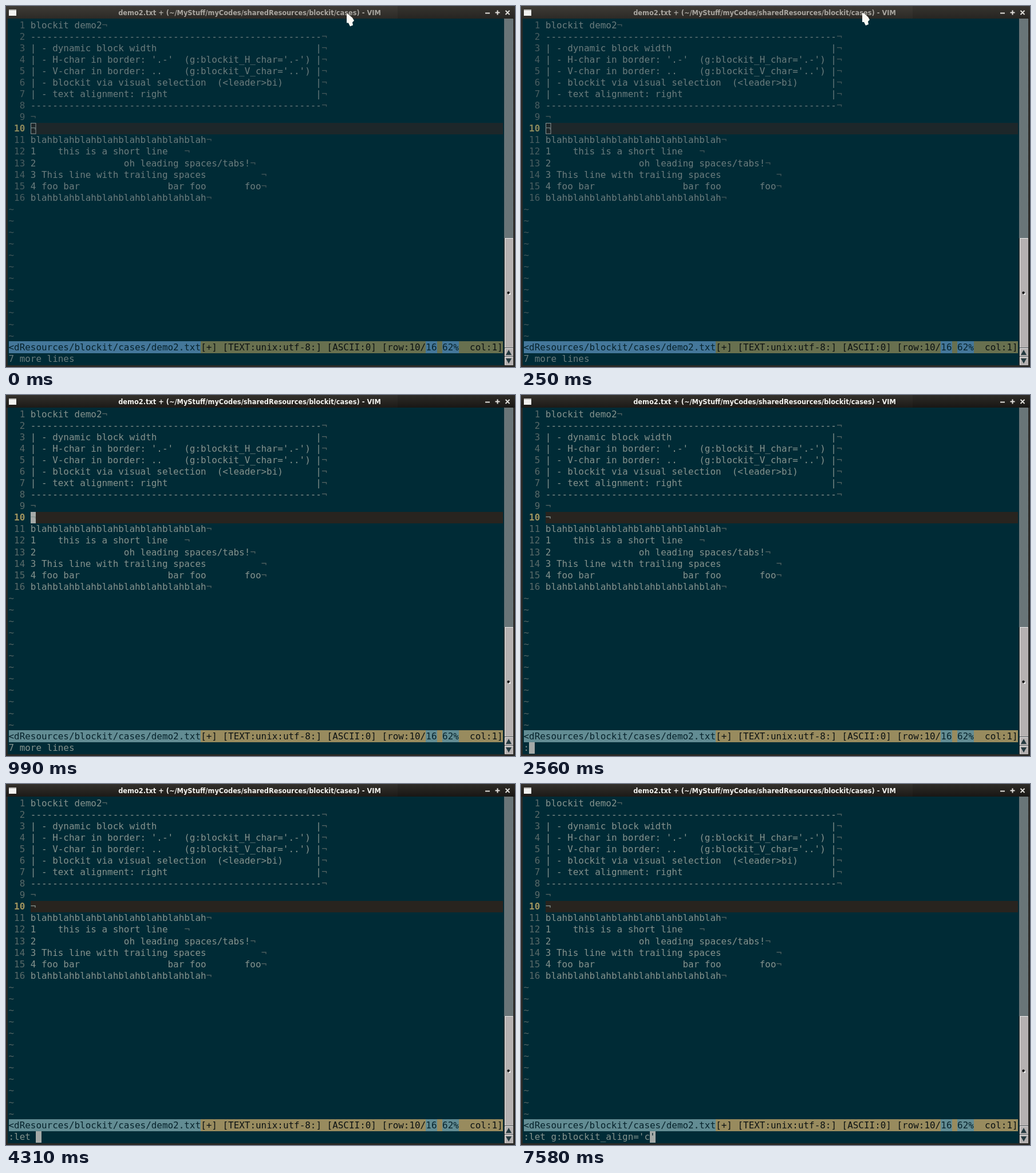
Animation of 889 by 630 pixels, one loop 8 s. Source, as an HTML page:

```html
<!DOCTYPE html>
<html lang="en">
<head>
<meta charset="utf-8">
<title>blockit demo</title>
<style>
  html, body { margin: 0; width: 100%; height: 100%; overflow: hidden; background: #002b36; }
  svg {
    display: block;
    --text: #6a7c7d; --faint: #425659; --number: #4a5e61; --current: #8d8a5c;
    --line: #1d272a; --left: #44779a; --right: #68704f;
    --title: #a9a6a0; --barTop: #3e3b36; --barEnd: #2c2a26;
  }
  svg.focused {
    --text: #84928d; --faint: #526362; --number: #596a69; --current: #a1955f;
    --line: #28241f; --left: #628c93; --right: #988b5e;
    --title: #f4f3ef; --barTop: #34312c; --barEnd: #1c1a17;
  }
  .mono text { font: 15.93px "DejaVu Sans Mono", monospace; white-space: pre; fill: var(--text); }
  .title { font: bold 11.4px "DejaVu Sans", sans-serif; fill: var(--title); text-anchor: middle; }
  .mono .faint { fill: var(--faint); }
  .mono .number { fill: var(--number); }
  .mono .current { fill: var(--current); font-weight: bold; }
  .mono .dark { fill: #06222b; }
  .mono .black { fill: #0b1112; }
  .left { fill: var(--left); }
  .right { fill: var(--right); }
  .line { fill: var(--line); }
  .block { fill: #a5aaa8; }
  .controls { stroke: #e2e0db; stroke-width: 2; fill: none; }
</style>
</head>
<body>
<svg id="stage" width="889" height="630" viewBox="0 0 889 630">
  <defs>
    <linearGradient id="bar" x2="0" y2="1">
      <stop style="stop-color: var(--barTop)"/>
      <stop offset="1" style="stop-color: var(--barEnd)"/>
    </linearGradient>
    <pattern id="stipple" width="2" height="2" patternUnits="userSpaceOnUse">
      <path fill="#293f45" d="M0 0h2v2h-2z"/>
      <path fill="#a9abab" d="M0 0h1v1h-1zM1 1h1v1h-1z"/>
    </pattern>
  </defs>

  <path fill="#2a2926" d="M0 0h889v630h-889z"/>
  <path fill="#002b36" d="M3 22h867v605h-867z"/>
  <path fill="url(#bar)" d="M0 0h889v22h-889z"/>
  <path fill="#000" opacity=".12" d="M684 0h205v22h-205z"/>
  <path fill="#f2f2f0" d="M5 6h13v11h-13z"/>
  <path fill="#b9b9b5" d="M5 6h13v2h-13z"/>
  <text class="title" x="425.5" y="16">demo2.txt + (~/MyStuff/myCodes/sharedResources/blockit/cases) - VIM</text>
  <path class="controls" d="M837 12.5h8M854.5 11.5h8M858.5 7.5v8M872.5 8l7 7M879.5 8l-7 7"/>

  <path fill="url(#stipple)" d="M870 22h16v383h-16z"/>
  <path fill="#b5b1b1" d="M871 405h15v222h-15z"/>
  <path fill="none" stroke="#eeecec" d="M871.5 596v-190.5h14M871.5 611v-13.5h14M871.5 626v-13.5h14"/>
  <path fill="none" stroke="#4d5558" d="M871 596.5h15M871 611.5h15"/>
  <path fill="#24393f" d="M878 600l5 9h-10zM878 624l5 -9h-10z"/>
  <path fill="#fff" d="M878 501h3v3h-3z"/>
  <circle cx="877.5" cy="500.5" r="2.2" fill="#111"/>

  <g id="editor" class="mono"></g>
  <g id="command" class="mono"></g>
  <path id="pointer" fill="#fbfaf4" d="M0 0L3 1L10 7L13 12L10 15L11 20L6 22L3 16L0 16Z"/>
</svg>
<script>
const LOOP = 8000, LEFT = 4.5, TOP = 23.5, CELL = 9.59, ROW = 20.07, BASELINE = 15.2;
const byId = id => document.getElementById(id);
const stage = byId('stage'), editor = byId('editor'), command = byId('command'), pointer = byId('pointer');

const escape = s => s.replace(/&/g, '&amp;').replace(/</g, '&lt;');
const colX = col => LEFT + col * CELL;
const rowY = row => TOP + (row - 1) * ROW;
const text = (row, col, s, cls = '') =>
  `<text class="${cls}" x="${colX(col)}" y="${rowY(row) + BASELINE}">${escape(s)}</text>`;

// Cell backgrounds snap to whole pixels.
function fill(row, col, count, cls, id = '') {
  const [x, right, y, bottom] =
    [colX(col), colX(col + count), rowY(row), rowY(row + 1)].map(Math.round);
  return `<rect id="${id}" class="${cls}" x="${x}" y="${y}" width="${right - x}" height="${bottom - y}"/>`;
}

const rule = '-'.repeat(53);
const boxed = s => ('| - ' + s).padEnd(52) + '|';
const blah = 'blah'.repeat(8);
const lines = [
  'blockit demo2',
  rule,
  boxed('dynamic block width'),
  boxed("H-char in border: '.-'  (g:blockit_H_char='.-')"),
  boxed("V-char in border: ..    (g:blockit_V_char='..')"),
  boxed('blockit via visual selection  (<leader>bi)'),
  boxed('text alignment: right'),
  rule,
  '',
  '',
  blah,
  '1    this is a short line   ',
  '2'.padEnd(17) + 'oh leading spaces/tabs!',
  '3 This line with trailing spaces'.padEnd(42),
  '4 foo bar'.padEnd(25) + 'bar foo'.padEnd(14) + 'foo',
  blah
];

function drawEditor() {
  let out = fill(10, 4, 86, 'line') + fill(10, 4, 1, 'block', 'cursor') +
    `<rect id="hollow" x="43.5" y="204.5" width="8.5" height="18.5" fill="none" stroke="#8b9696"/>`;
  lines.forEach((s, i) => {
    const row = i + 1;
    out += text(row, 0, String(row).padStart(3), row === 10 ? 'current' : 'number');
    out += text(row, 4, s) + text(row, 4 + s.length, '¬', row === 10 ? '' : 'faint');
  });
  for (let row = 17; row <= 28; row++) out += text(row, 0, '~', 'faint');

  out += fill(29, 0, 90, 'right');
  for (const [col, count] of [[0, 35], [76, 2], [79, 3]]) out += fill(29, col, count, 'left');
  out += text(29, 0, '<dResources/blockit/cases/demo2.txt', 'dark');
  out += text(29, 35, '[+] [TEXT:unix:utf-8:] [ASCII:0] [row:10/', 'black');
  out += text(29, 76, '16 62%', 'dark') + text(29, 84, 'col:1]', 'black');
  editor.innerHTML = out;
}

// Each entry: start time, command line, cursor column.
const setting = ":let g:blockit_align='c'";
const typing = [
  [0, '7 more lines'],
  [2560, ':', 1],
  [3150, ':l', 2],
  [3240, ':le', 3],
  [4000, ':let', 4],
  [4310, ':let ', 5],
  [5380, setting, 24],
  [7580, setting, 23]
];
// Each entry: start time, pointer position.
const moves = [
  [0, 595, 13.5], [210, 595.5, 12.5], [250, 596, 12],
  [840, 640, 22], [890, 710, 30], [940, 776, 35], [990, -50, -50]
];
const at = (track, time) => track.findLast(entry => entry[0] <= time);
const show = (node, visible) => node.setAttribute('visibility', visible ? 'visible' : 'hidden');

drawEditor();
const cursor = byId('cursor'), hollow = byId('hollow');
let shown;

function frame(now) {
  const time = now % LOOP;
  const focused = time >= 470;
  stage.classList.toggle('focused', focused);
  show(hollow, !focused);
  show(cursor, focused && time < 2560);

  const [, x, y] = at(moves, time);
  pointer.setAttribute('transform', `translate(${x} ${y})`);

  const entry = at(typing, time);
  if (entry !== shown) {
    const [, s, col] = shown = entry;
    command.innerHTML = text(30, 0, s) +
      (col ? fill(30, col, 1, 'block') + text(30, col, s.slice(col), 'dark') : '');
  }
  requestAnimationFrame(frame);
}
frame(0);
</script>
</body>
</html>
```
